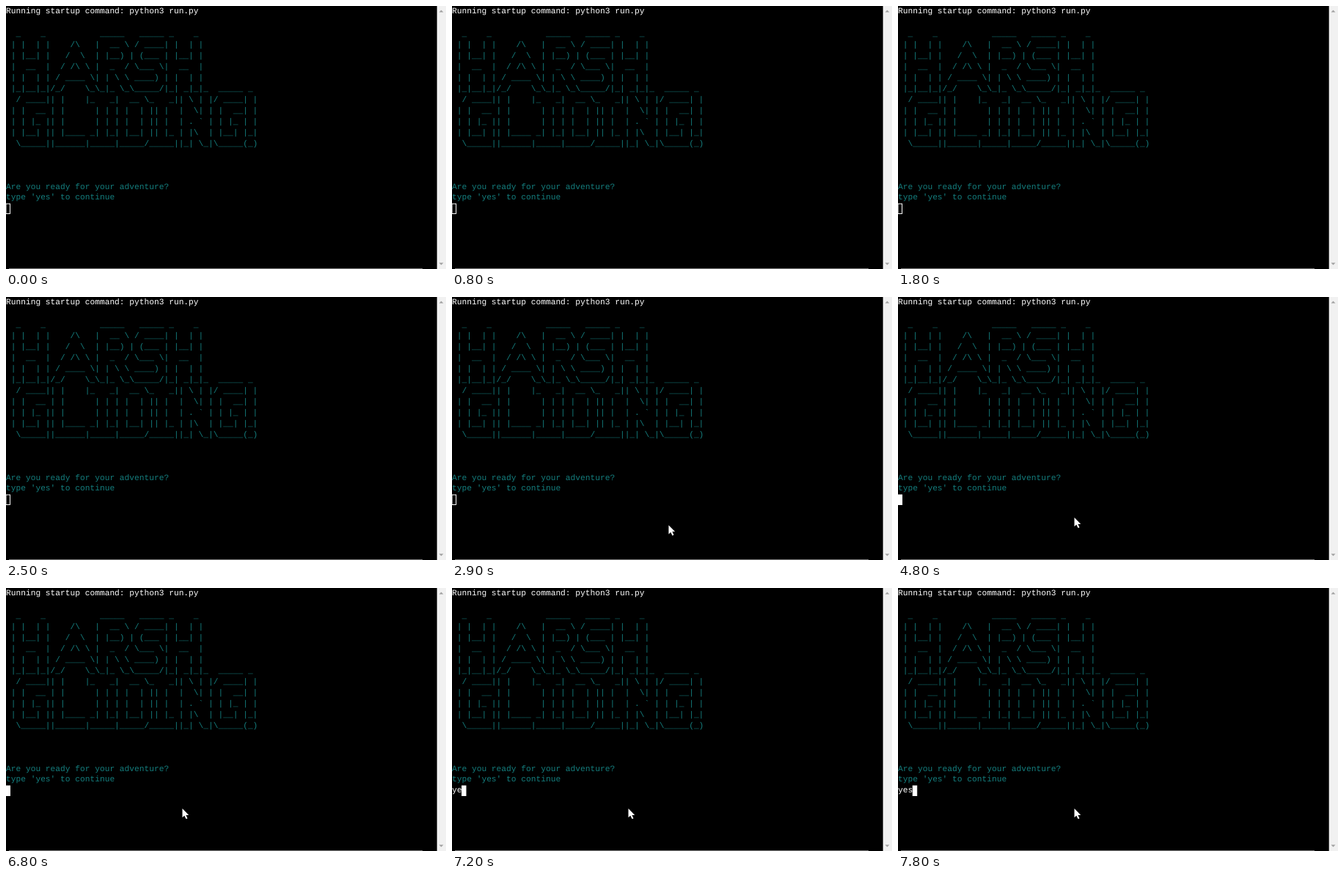
Recreate the animation shown at these times as an HTML page. Size 600 by 359 pixels, loop 8000 ms.

```html
<!DOCTYPE html>
<html lang="en">
<head>
<meta charset="utf-8">
<title>Terminal</title>
<style>
  html, body { margin: 0; width: 100%; height: 100%; overflow: hidden; background: #000; }
  #stage { position: relative; width: 600px; height: 359px; overflow: hidden; }
  pre {
    position: absolute; left: 0; top: 0; margin: 0; color: #147e7e;
    font: 11.22px/14.97px "Liberation Mono", monospace;
    text-rendering: geometricPrecision; font-variant-ligatures: none;
    transform: translateY(1.4px);
  }
  #title { position: relative; top: 1px; }
  .white { color: #fff; }
  svg { position: absolute; left: 0; top: 0; }
</style>
</head>
<body>
<div id="stage">
  <pre><span class="white">Running startup command: python3 run.py</span>

<span id="title"></span>


Are you ready for your adventure?
type 'yes' to continue
<span id="typed" class="white"></span></pre>
  <svg width="600" height="359">
    <rect x="4" y="358" width="564" height="1" fill="#777"/>
    <rect x="587.7" width="13" height="359" fill="#f1f1f1"/>
    <path d="M590.5 8.5l3-3 3 3zM590.5 350.5l3 3 3-3z" fill="#a0a0a0"/>
    <rect id="caret" y="270" width="5.5" height="13.5" stroke="#fff"/>
    <path id="mouse" d="M0 0V12.3L2.8 9.7 5 14.3 7 13.4 4.9 8.9H8.7Z" fill="#fff"/>
  </svg>
</div>
<script>
const $ = id => document.getElementById(id);

// Block letters, one text row per line; ' stands for a backtick
const LETTERS = 'HARSGLIDN!';
const glyphRows = String.raw`
 _    _ ,          , _____  ,  _____ ,  _____ , _      , _____ , _____  , _   _ , _ 
| |  | |,    /\    ,|  __ \ , / ____|, / ____|,| |     ,|_   _|,|  __ \ ,| \ | |,| |
| |__| |,   /  \   ,| |__) |,| (___  ,| |  __ ,| |     ,  | |  ,| |  | |,|  \| |,| |
|  __  |,  / /\ \  ,|  _  / , \___ \ ,| | |_ |,| |     ,  | |  ,| |  | |,| . ' |,| |
| |  | |, / ____ \ ,| | \ \ , ____) |,| |__| |,| |____ , _| |_ ,| |__| |,| |\  |,|_|
|_|  |_|,/_/    \_\,|_|  \_\,|_____/ , \_____|,|______|,|_____|,|_____/ ,|_| \_|,(_)
`.replace("'", '`').split('\n').slice(1, 7).map(row => row.split(','));

// Where letters overlap, the stronger character stays
const strength = c => (' _|'.indexOf(c) + 4) % 4;
const grid = Array.from({ length: 11 }, () => Array(52).fill(' '));

function drawWord(word, columns, top) {
  [...word].forEach((letter, i) => glyphRows.forEach((row, y) =>
    [...row[LETTERS.indexOf(letter)]].forEach((c, x) => {
      const line = grid[top + y], col = columns[i] + x;
      if (strength(c) > strength(line[col])) line[col] = c;
    })));
}
drawWord('HARSH', [1, 9, 18, 25, 32], 0);
drawWord('GLIDING!', [1, 9, 16, 22, 28, 35, 41, 48], 5);
$('title').textContent = grid.map(line => line.join('')).join('\n') + '\n';

const LOOP = 8000, CHAR = 6.733;

function mouseAt(t) {
  if (t >= 4100) return [240.5, 301];
  const left = Math.max(0, 1 - Math.floor((t - 2500) / 100) / 7) ** 2;
  return [238.5 + 310 * left, 300 + 62 * left];
}

function frame(now) {
  const t = now % LOOP;
  const count = Math.max(0, Math.min(3, Math.floor((t - 7000) / 100)));
  $('typed').textContent = 'yes'.slice(0, count);
  $('caret').setAttribute('x', count * CHAR);
  $('caret').setAttribute('fill', t >= 3800 ? '#fff' : 'none');
  $('mouse').setAttribute('visibility', t >= 2600 ? 'visible' : 'hidden');
  $('mouse').setAttribute('transform', `translate(${mouseAt(t)})`);
  requestAnimationFrame(frame);
}
requestAnimationFrame(frame);
</script>
</body>
</html>
```
